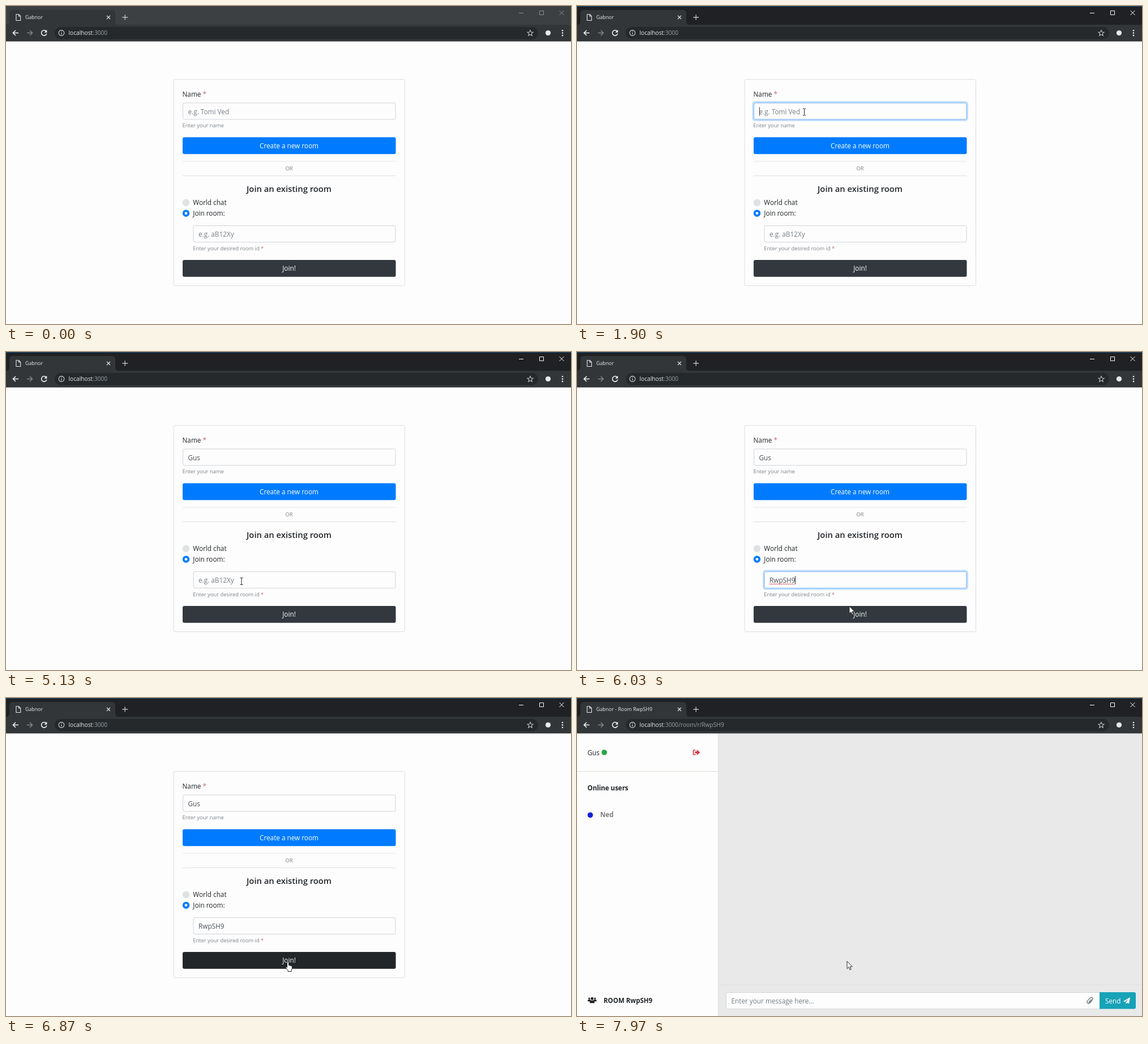
Recreate the animation shown at these times as an HTML page. Size 998 px wide and 561 px high, loop 8 s.

```html
<!DOCTYPE html>
<html lang="en">
<head>
<meta charset="utf-8">
<title>Chat room</title>
<style>
  html, body { margin: 0; width: 100%; height: 100%; overflow: hidden; background: #fdfdfd; }
  svg { display: block; width: 998px; height: 561px; }
  text { font: 11.75px "Open Sans", "Noto Sans", sans-serif; fill: #212529; white-space: pre; }
  .small { font-size: 9.4px; fill: #7a8087; }
  .hint { fill: #767d84; }
  .value { fill: #495057; }
  .bold { font-weight: 700; font-size: 11.5px; }
  .head { font-weight: 600; font-size: 14.8px; }
  .mid { text-anchor: middle; }
  .light { fill: #fff; }
  .tab { font-size: 8.8px; fill: #e8eaed; }
  .url { font-size: 10.2px; fill: #e8eaed; }
  .dim, .dim tspan { fill: #9aa0a6; }
  .req { fill: #c56a70; }
  .line { fill: none; stroke-width: 1.3; }
</style>
</head>
<body>
<svg viewBox="0 0 998 561" id="stage"></svg>
<script>
const LOOP = 8000;
const APP = 'Gabnor', SAMPLE = 'Tomi Ved', ME = 'Gus', FRIEND = 'Ned', ROOM = 'RwpSH9';

const text = (x, y, s, cls = '', id = '') => `<text x="${x}" y="${y}" class="${cls}" id="${id}">${s}</text>`;
const rect = (x, y, w, h, r, attrs) => `<rect x="${x}" y="${y}" width="${w}" height="${h}" rx="${r}" ${attrs}/>`;
const dot = (x, y, r, fill) => `<circle cx="${x}" cy="${y}" r="${r}" fill="${fill}"/>`;
const line = (d, stroke, attrs = '') => `<path class="line" d="${d}" stroke="${stroke}" ${attrs}/>`;
const shape = (d, fill, attrs = '') => `<path d="${d}" fill="${fill}" ${attrs}/>`;

const field = (id, x, y, w, sample) => `
  ${rect(x + .5, y + .5, w - 1, 29, 3, 'fill="#fdfdfd" stroke="#ced4da"')}
  <g id="${id}Ring">
    ${rect(x - 1.25, y - 1.25, w + 2.5, 32.5, 4, 'fill="none" stroke="#007bff" stroke-opacity=".25" stroke-width="2.5"')}
    ${rect(x + .5, y + .5, w - 1, 29, 3, 'fill="none" stroke="#80bdff"')}
  </g>
  ${text(x + 9.5, y + 20.4, sample, 'hint', id + 'Hint')}
  ${text(x + 9.5, y + 20.4, '', 'value', id + 'Text')}
  ${rect(0, y + 8, 1, 15, 0, `id="${id}Caret" fill="#333"`)}`;

const browser = `
  ${rect(0, 0, 998, 34, 0, 'id="titleBar"')}
  ${rect(0, 0, 998, 1, 0, 'id="accent" fill="#1b5079"')}
  ${shape('M0 33q6 0 6-6V13q0-6 6-6H187q6 0 6 6V27q0 6 6 6z', '#323639')}
  ${rect(0, 33, 998, 29.5, 0, 'fill="#323639"')}
  ${rect(86, 37, 854, 21.5, 10.7, 'fill="#25292b"')}
  <g id="pageIcon">${line('M17.9 14.7h4.8l3 3V25.5h-7.8zM22.4 14.9v3.1h3.2', '#e8eaed', 'style="stroke-width:1.1"')}</g>
  <g id="spinner">${line('M21.7 15.4a4.8 4.8 0 1 1-4.8 4.8', '#9aa0a6')}</g>
  ${text(34, 23.3, APP, 'tab', 'tabTitle')}
  ${line('M178 17l6 6m0-6l-6 6', '#dadce0')}
  ${line('M205.5 20h9.5M210.2 15.3v9.5', '#bdc1c6')}
  <g id="controls" class="line" style="stroke-width:1">
    <path d="M906 12.5h8M942.5 8.5h7v7h-7zM977.5 8l8 8m0-8l-8 8"/>
  </g>
  ${line('M22 47.5H12.6M17 43l-4.6 4.5L17 52', '#f1f3f4', 'style="stroke-width:1.6"')}
  ${line('M37 47.5h9.4M42 43l4.6 4.5L42 52', '#84888c', 'style="stroke-width:1.4"')}
  <g id="reload">${line('M71 44.6A4.7 4.7 0 1 0 71.8 48.6', '#f1f3f4', 'style="stroke-width:1.6"')}${shape('M72.3 42v4.8h-4.8z', '#f1f3f4')}</g>
  <g id="stop">${line('M63 43.5l8 8m0-8l-8 8', '#f1f3f4', 'style="stroke-width:1.6"')}</g>
  ${line('M98 42.6a4.9 4.9 0 1 1-.1 0zM98 46.8v3.4M98 44.5v1.2', '#dadce0', 'style="stroke-width:1.1"')}
  <text x="110.5" y="51.2" class="url">localhost<tspan class="dim" id="path">:3000</tspan></text>
  ${line('M926 42.6l1.5 3.4 3.6.3-2.8 2.4.9 3.6-3.2-1.9-3.2 1.9.9-3.6-2.8-2.4 3.6-.3z', '#c4c7ca', 'style="stroke-width:1.1"')}
  ${dot(957.5, 47.5, 4.6, '#e8eaed')}
  ${[43.3, 47.6, 51.9].map(y => dot(983, y, 1.3, '#e8eaed')).join('')}`;

const home = `
  ${rect(296, 129.5, 408.5, 364, 3, 'fill="#fdfdfd" stroke="#dddee1"')}
  ${text(311.5, 160, 'Name <tspan class="req">*</tspan>')}
  ${field('name', 312, 170.5, 376.5, 'e.g. ' + SAMPLE)}
  ${text(311.5, 214.3, 'Enter your name', 'small')}
  ${rect(312, 231.5, 376.5, 29.8, 3, 'id="create"')}
  ${text(500, 251, 'Create a new room', 'mid light')}
  ${rect(312, 273.5, 376.5, 1, 0, 'fill="#e6e7e8"')}
  ${text(500, 290, 'OR', 'small mid')}
  ${rect(312, 299, 376.5, 1, 0, 'fill="#dfe0e1"')}
  ${text(500, 328.2, 'Join an existing room', 'head mid')}
  ${dot(318, 347, 6.2, '#dee2e2')}
  ${text(330.3, 351.4, 'World chat')}
  ${dot(318, 365.7, 6.2, '#007bff')}${dot(318, 365.7, 2.4, '#fff')}
  ${text(330.3, 370.2, 'Join room:')}
  ${field('room', 330.5, 387, 358, 'e.g. aB12Xy')}
  ${line('', '#d9534f', 'id="squiggle" style="stroke-width:1"')}
  ${text(330.3, 430.8, 'Enter your desired room id <tspan class="req">*</tspan>', 'small')}
  ${rect(310.75, 446.75, 379, 32.3, 4, 'id="joinRing" fill="none" stroke="#343a40" stroke-opacity=".5" stroke-width="2.5"')}
  ${rect(312, 448, 376.5, 29.8, 3, 'id="join"')}
  ${text(500, 467.3, 'Join!', 'mid light')}`;

const person = (x, y, k) => shape(`M${x - 2.5 * k} ${y}a${2.5 * k} ${2.5 * k} 0 1 1 ${5 * k} 0a${2.5 * k} ${2.5 * k} 0 1 1 ${-5 * k} 0zM${x - 4.2 * k} ${y + 8 * k}v${-2 * k}q0-${2.8 * k} ${2.8 * k}-${2.8 * k}h${2.8 * k}q${2.8 * k} 0 ${2.8 * k} ${2.8 * k}v${2 * k}z`, '#212529');

const chat = `
  ${rect(249, 62.5, 749, 499, 0, 'fill="#e9e9e9"')}
  ${rect(249, 62.5, 1, 499, 0, 'fill="#dcdde0"')}
  ${text(18.5, 101.3, ME)}${dot(48.2, 96, 4.8, '#28a745')}
  ${line('M209.5 92h-3q-1 0-1 1v6q0 1 1 1h3', '#dc3545', 'style="stroke-width:1.7"')}
  ${shape('M208.5 94.3h3.2V91l5.6 5-5.6 5v-3.3h-3.2z', '#dc3545')}
  ${rect(0, 129, 249, 1, 0, 'fill="#e0e1d8"')}
  ${text(18.5, 162.8, 'Online users', 'bold')}
  ${dot(23.4, 206.5, 4.8, '#1422d6')}
  <text x="41" y="209.8" class="bold" style="fill:#7b7b7b">${FRIEND}</text>
  ${person(21.6, 530, .65)}${person(31.8, 530, .65)}${person(26.7, 530.2, 1)}
  ${text(47, 537.8, 'ROOM ' + ROOM, 'bold')}
  ${rect(250, 505.5, 748, 1, 0, 'fill="#e0e0dc"')}
  ${rect(263.5, 519.5, 662, 29, 3, 'fill="#fdfdfd" stroke="#ced4da"')}
  ${text(272.5, 539.2, 'Enter your message here...', 'hint')}
  ${line('M908.6 531.5l-4.3 4.5q-.6 1.4 1 1.4l5-5.2q1.5-2-.3-3.6-1.8-1.2-3.4.3l-4.9 5.2q-1.8 2.4 0 4.2 2 1.5 4.1-.3l4-4', '#6c757d')}
  ${shape('M923 519H984q3 0 3 3V545.500q0 3-3 3H923z', '#17a2b8')}
  ${text(933, 538.5, 'Send', 'light')}
  ${shape('M977 528l-12 7 2.800 1.200 7-5.800-5.300 6.600V540l2-2.300 3.500 1.500z', '#fff')}`;

const pointers = `
  <g id="arrow">${shape('M0 0V13l3-2.800 2.100 4.800 2-.9-2-4.700h4.200z', '#fff', 'stroke="#111" stroke-width=".9"')}</g>
  <g id="hand">${shape('M-1.500 1q0-1.500 1.500-1.500t1.500 1.500v4.300l4.500 1.200q1.300.4 1.300 1.700v3.300l-1.300 3v2h-6v-2l-3.800-4.800q-.6-1.600.9-1.600l1.400 1.300z', '#fff', 'stroke="#111" stroke-width=".9"')}</g>
  <g id="beam">${line('M-2.500-6h1.700L0-5.500.8-6h1.700M0-5.500v11M-2.500 6h1.700L0 5.500.8 6h1.700', '#222', 'style="stroke-width:1"')}</g>`;

stage.innerHTML = `${rect(0, 0, 998, 561, 0, 'fill="#fdfdfd"')}
  <g id="home">${home}</g><g id="chat">${chat}</g>${browser}<g id="pointer">${pointers}</g>`;

const $ = id => document.getElementById(id);
const show = (id, on) => { $(id).style.display = on ? '' : 'none'; };
const clamp = v => Math.max(0, Math.min(1, v));
const between = (t, a, b) => t >= a && t < b;
// Rises after a and falls after b, each over 150 ms.
const fade = (t, a, b) => clamp((t - a) / 150) - clamp((t - b) / 150);
const mix = (a, b, k) => `rgb(${a.map((v, i) => Math.round(v + (b[i] - v) * k))})`;

// time, x, y of the pointer's hot spot
const track = [
  [180, -12, 456], [820, 424, 207], [980, 424, 207], [1330, 401.500, 187],
  [4350, 401.500, 187], [5000, 416, 404.500], [5620, 416, 404.500],
  [6000, 481, 448.500], [6060, 481, 448.500], [6450, 498, 466],
  [7650, 498, 466], [7900, 477, 464.500]
];
function pointerAt(t) {
  const i = track.findIndex(k => k[0] > t);
  if (i < 0) return track.at(-1).slice(1);
  if (i === 0) return track[0].slice(1);
  const [a, x, y] = track[i - 1], [b, u, v] = track[i];
  const k = (t - a) / (b - a), e = k * k * (3 - 2 * k);
  return [x + (u - x) * e, y + (v - y) * e];
}

const SWAP = 7700, LOADING = 7300;
const inputs = {
  name: { x: 321.5, focus: 1380, blur: 4500, typed: [[3550, ME[0]], [3720, ME.slice(0, 2)], [3880, ME]] },
  room: { x: 340, focus: 5150, blur: 6600, typed: [[5580, ROOM]] }
};

function drawInput(id, t) {
  const { x, focus, blur, typed } = inputs[id];
  const last = typed.filter(k => t >= k[0]).at(-1);
  const label = $(id + 'Text'), value = last ? last[1] : '';
  if (label.textContent !== value) label.textContent = value;
  show(id + 'Hint', !value);
  $(id + 'Ring').style.opacity = fade(t, focus, blur);
  const since = last ? last[0] : focus;
  show(id + 'Caret', between(t, focus, blur) && (t - since) % 1060 < 530);
  const width = value ? label.getComputedTextLength() : 0;
  $(id + 'Caret').setAttribute('x', Math.round(x + width));
  return width;
}

function squiggle(x, y, width) {
  let d = `M${x} ${y}`;
  for (let i = 1; i * 2 <= width; i++) d += `L${x + i * 2} ${y + (i % 2 ? 1.6 : 0)}`;
  return d;
}

// First moment of each stretch over a button, found along the track.
const inCreate = (x, y) => between(x, 312, 688) && between(y, 231, 261);
const inJoin = (x, y) => between(x, 312, 688) && between(y, 451, 478);
const hover = (t, hit) => {
  let sum = 0;
  for (let back = 0; back < 150; back += 15) sum += hit(...pointerAt(t - back));
  return sum / 10;
};

function draw(t) {
  const active = t >= 430, loaded = t >= SWAP, loading = between(t, LOADING, SWAP);
  $('titleBar').setAttribute('fill', active ? '#1f2124' : '#3c4043');
  $('controls').setAttribute('stroke', active ? '#fff' : '#8b8f92');
  show('accent', active);
  show('home', !loaded);
  show('chat', loaded);
  show('pageIcon', !loading);
  show('spinner', loading);
  show('reload', !loading);
  show('stop', loading);
  $('spinner').setAttribute('transform', `rotate(${-t * .36} 21.7 20.2)`);
  $('tabTitle').textContent = loaded ? `${APP} - Room ${ROOM}` : APP;
  $('path').textContent = loaded ? `:3000/room/r/${ROOM}` : ':3000';

  if (!loaded) {
    drawInput('name', t);
    const width = drawInput('room', t);
    $('squiggle').setAttribute('d', between(t, 5580, 6600) ? squiggle(340, 408.600, width) : '');
    $('create').setAttribute('fill', mix([0, 123, 255], [0, 105, 217], hover(t, inCreate)));
    $('join').setAttribute('fill', mix([50, 56, 62], [34, 38, 41], hover(t, inJoin)));
    $('joinRing').style.opacity = fade(t, 7000, LOOP);
  }

  const [x, y] = pointerAt(t);
  const overInput = between(y, 171, 200) && between(x, 312, 688) || between(y, 387, 417) && between(x, 331, 688);
  const kind = loaded ? 'arrow' : overInput ? 'beam' : inCreate(x, y) || inJoin(x, y) ? 'hand' : 'arrow';
  for (const k of ['arrow', 'beam', 'hand']) show(k, k === kind);
  $('pointer').setAttribute('transform', `translate(${x} ${y})`);
}

const start = performance.now();
function tick() {
  draw((performance.now() - start) % LOOP);
  requestAnimationFrame(tick);
}
tick();
</script>
</body>
</html>
```
